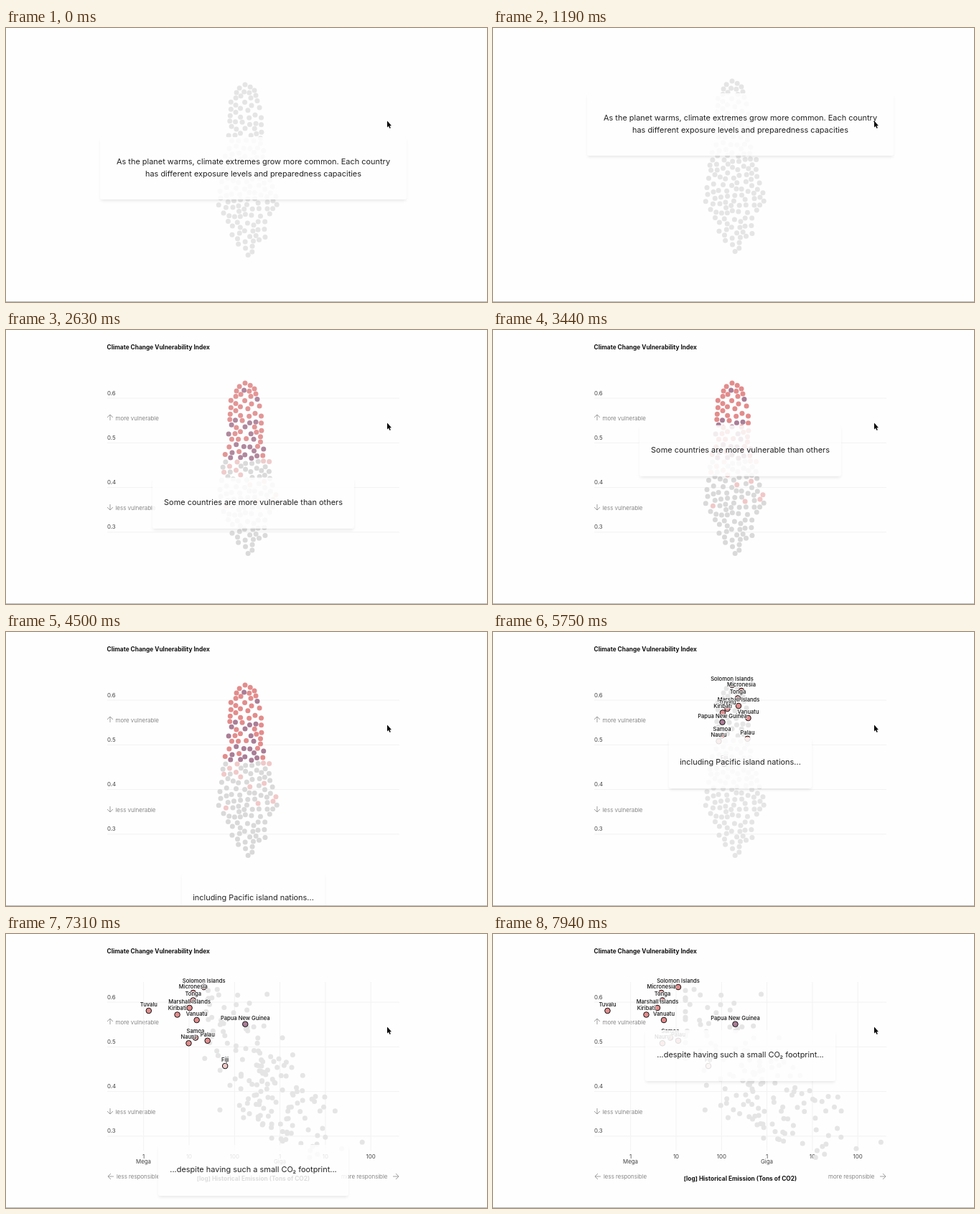
Write an HTML page that moves like this. It is 670 px wide and 382 px high and loops after 8 s.

```html
<!DOCTYPE html>
<html lang="en">
<head>
<meta charset="utf-8">
<style>
html, body { margin: 0; width: 100%; height: 100%; overflow: hidden; background: #fefefe; }
body { position: relative; font-family: Inter, "Open Sans", sans-serif; }
svg { position: absolute; left: 0; top: 0; }
text { font: 300 8px Inter, "Open Sans", sans-serif; fill: #666; }
text.tick { font-weight: 400; font-size: 7.9px; fill: #444; }
text.title { font-weight: 700; font-size: 8.35px; fill: #111; }
text.name { font-weight: 500; font-size: 7.6px; fill: #111; text-anchor: middle;
  stroke: #fefefe; stroke-width: 1.6px; paint-order: stroke; stroke-linejoin: round; }
text.mid { text-anchor: middle; }
.grid { stroke: #f2f2f2; fill: none; }
.arrow { stroke: #888; stroke-width: .8; fill: none; }
.card { position: absolute; left: 344.5px; display: flex; align-items: center;
  justify-content: center; text-align: center; white-space: pre; border-radius: 3px;
  background: rgba(254,254,254,.86); box-shadow: 0 3px 4px -1px rgba(0,0,0,.09);
  color: #222; font-size: 10.95px; line-height: 17.5px; }
</style>
</head>
<body>
<svg width="670" height="382">
  <g id="yAxis">
    <text class="title" x="140.5" y="27.3">Climate Change Vulnerability Index</text>
    <path class="arrow" d="M145 126v-8m-4 4l4-4l4 4M145 243v8m-4-4l4 4l4-4"/>
    <text x="152.5" y="126.3">more vulnerable</text>
    <text x="152.5" y="250.8">less vulnerable</text>
  </g>
  <g id="xAxis">
    <text class="tick mid" x="191.5" y="320.3">Mega</text>
    <text class="tick mid" x="381.5" y="320.3">Giga</text>
    <text class="title mid" x="344.5" y="344">[log] Historical Emission (Tons of CO2)</text>
    <path class="arrow" d="M150 338h-8m4-4l-4 4l4 4M539 338h8m-4-4l4 4l-4 4"/>
    <text x="154" y="341">less responsible</text>
    <text x="467" y="341">more responsible</text>
  </g>
  <g id="swarm"></g>
  <g id="islands"></g>
</svg>
<div id="cards"></div>
<svg width="670" height="382">
  <path d="M0 381.5H670" stroke="#b8b8b8"/>
  <path d="M531 129.5v9l2-1.8l1.5 3.2l1.3-.6l-1.4-3.1h2.6z" fill="#000"/>
</svg>
<script>
const LOOP = 8000, GAP = 446;
const RED = [227, 140, 140], PURPLE = [170, 125, 150], PINK = [241, 200, 200],
      GRAY = [217, 217, 217], PALE = [229, 229, 229];
const $ = id => document.getElementById(id);
const clamp = (v, lo, hi) => Math.max(lo, Math.min(hi, v));
const ramp = (t, a, b) => clamp((t - a) / (b - a), 0, 1);
const ease = p => p < .5 ? 4 * p ** 3 : 1 - 4 * (1 - p) ** 3;
const mix = (a, b, k) => a + (b - a) * k;

// Linear interpolation through [input, output] points
function along(points, v) {
  const i = clamp(points.findIndex(p => p[0] > v), 1, points.length - 1);
  const last = points[points.length - 1];
  if (v >= last[0]) return last[1];
  const [a, b] = [points[i - 1], points[i]];
  return mix(a[1], b[1], ramp(v, a[0], b[0]));
}

let seed = 11;
const rnd = () => (seed = (seed * 16807) % 2147483647) / 2147483647;

function add(parent, tag, attrs, text = '') {
  const el = document.createElementNS('http://www.w3.org/2000/svg', tag);
  for (const k in attrs) el.setAttribute(k, attrs[k]);
  el.textContent = text;
  return parent.appendChild(el);
}

for (let i = 0; i < 4; i++) {
  const y = 95 + i * 62.3;
  add($('yAxis'), 'path', { class: 'grid', d: `M141 ${y}H548` });
  add($('yAxis'), 'text', { class: 'tick', x: 141, y: y - 4.5 }, (.6 - i / 10).toFixed(1));
}
for (let i = 0; i < 6; i++) {
  const x = 191.7 + i * 63.3;
  add($('xAxis'), 'path', { class: 'grid', d: `M${x} 67V302` });
  add($('xAxis'), 'text', { class: 'tick mid', x, y: 313 }, 10 ** (i % 3));
}

// Vulnerability picks the hue, emission (x on the scatter plot) the shade
function colorOf(y, emission) {
  if (y < 181) return emission > 332 ? PURPLE : RED;
  return emission < 355 - (y - 181) * .5 ? PINK : GRAY;
}

const dots = [];
function addDot(x, y, emission, name) {
  const g = add($(name ? 'islands' : 'swarm'), 'g', {});
  const circle = add(g, 'circle', name ? { stroke: '#111' } : { r: 3.5 });
  const label = name && add(g, 'text', { class: 'name', y: -6.2 }, name);
  dots.push({ x, y, emission, color: colorOf(y, emission), g, circle, label });
}

// Name, swarm x, y, emission x
for (const [name, x, y, emission] of [
  ['Solomon Islands', 333, 74, 258], ['Micronesia', 346, 82, 234.5], ['Tonga', 341, 92.5, 236],
  ['Marshall Islands', 342, 103, 229], ['Tuvalu', 326.5, 107, 159.5], ['Kiribati', 320, 112.5, 213.5],
  ['Vanuatu', 355.5, 120, 238], ['Papua New Guinea', 319.5, 125.7, 337.5], ['Samoa', 319, 144.5, 247],
  ['Palau', 354.5, 148.8, 258], ['Nauru', 314.5, 152.3, 236], ['Fiji', 322, 184, 300]])
  addDot(x, y, emission, name);

// Fill the swarm outline at random, keeping dots apart
const outline = [[67, 1], [95, 20], [150, 25], [185, 32], [240, 42], [268, 25], [287, 24], [312, 1]];
for (let i = 0; i < 9000; i++) {
  const y = 67 + 245 * rnd();
  const x = 333 + (y - 67) * .018 + along(outline, y) * (rnd() * 2 - 1);
  if (dots.some(d => Math.hypot(d.x - x, d.y - y) < 7.2)) continue;
  const spread = (rnd() + rnd() + rnd() - 1.5) * 95;
  addDot(x, y, clamp(290 + (y - 90) * .7 + spread, 268, 549));
}

const cards = [
  ['As the planet warms, climate extremes grow more common. Each country\nhas different exposure levels and preparedness capacities', 427, 87],
  ['Some countries are more vulnerable than others', 281, 71],
  ['including Pacific island nations...', 199, 71],
  ['...despite having such a small CO₂ footprint...', 265, 71]
].map(([text, w, h], i) => {
  const el = document.createElement('div');
  el.className = 'card';
  el.textContent = text;
  el.style.cssText = `width:${w}px;height:${h}px;margin-left:${-w / 2}px;top:${195 + i * GAP - h / 2}px`;
  return $('cards').appendChild(el);
});

// Scroll position over time, one flick per segment
const scroll = [[1000, 0], [1750, 240], [1940, 242], [2560, 394], [3440, 473], [4190, 584],
  [4500, 716], [5750, 905], [6750, 1130], [7440, 1221], [7940, 1364]];

function draw(now) {
  const t = now % LOOP;
  const y = t < 1000 ? 0 : along(scroll, t);
  const tint = ease(ramp(t, 2000, 2900));
  const focus = ease(ramp(t, 4530, 5050));
  const move = ease(ramp(t, 6700, 7700));
  const drop = Math.max(0, 5 - y);

  $('yAxis').style.opacity = ease(ramp(t, 1980, 2500));
  $('xAxis').style.opacity = ease(ramp(t, 6780, 7300));
  for (const d of dots) {
    const k = d.label ? tint : tint * (1 - focus);
    d.g.setAttribute('transform', `translate(${mix(d.x, d.emission, move)} ${d.y + drop})`);
    d.circle.setAttribute('fill', `rgb(${PALE.map((p, i) => Math.round(mix(p, d.color[i], k)))})`);
    if (d.label) {
      d.circle.setAttribute('stroke-opacity', focus);
      d.circle.setAttribute('r', mix(3.5, 3.8, focus));
      d.label.style.opacity = focus;
    }
  }
  for (const card of cards) card.style.transform = `translateY(${-y}px)`;
  requestAnimationFrame(draw);
}
requestAnimationFrame(draw);
</script>
</body>
</html>
```
